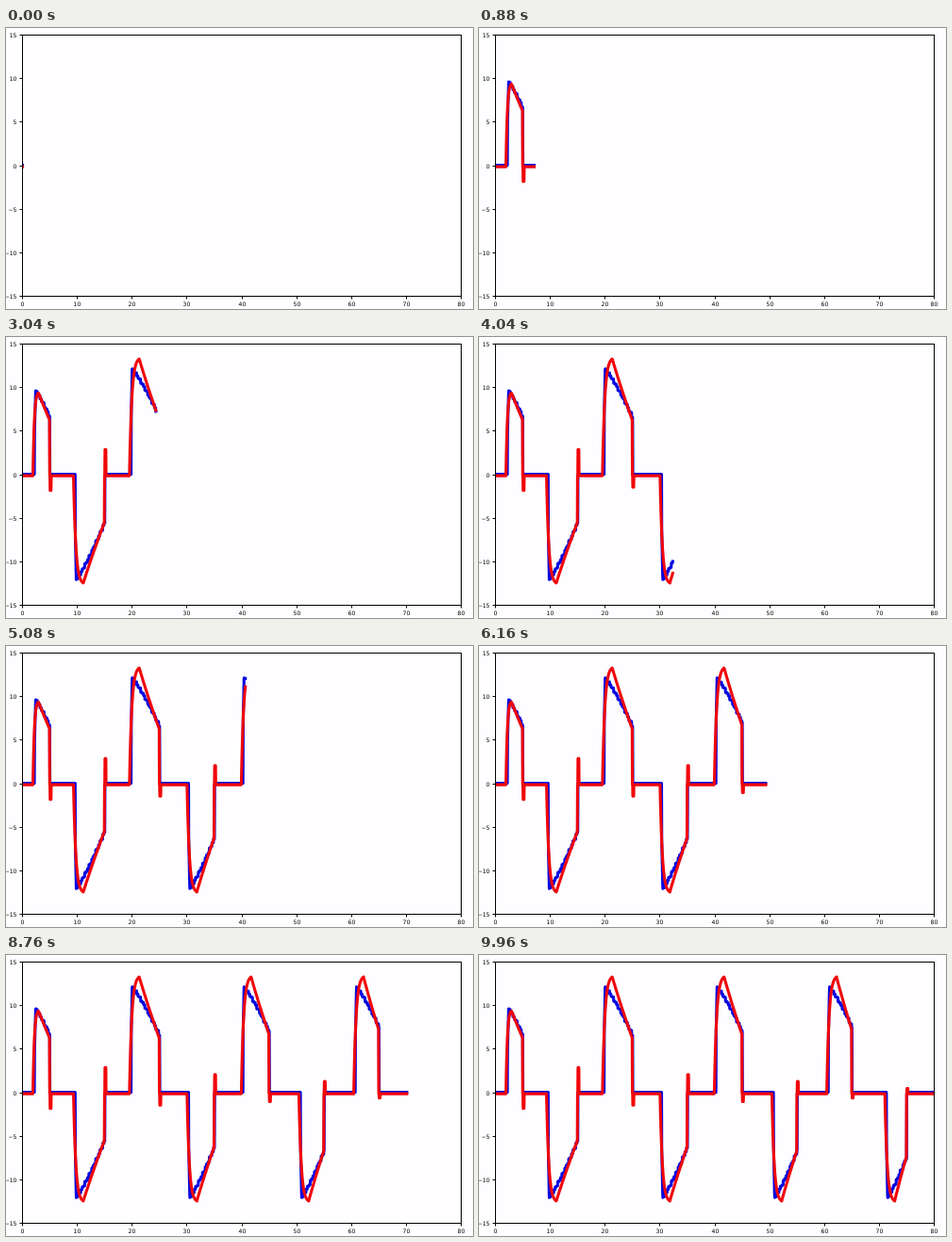
An HTML page for the animation above (10 s loop, 495x298 px).

```html
<!DOCTYPE html>
<html lang="en">
<head>
<meta charset="utf-8">
<title>Signal plot</title>
<style>
  html, body { margin: 0; width: 100%; height: 100%; overflow: hidden; background: #fefdff; }
  svg { display: block; width: 495px; height: 298px; }
  text { font: 6.1px "DejaVu Sans", sans-serif; fill: #000; }
  .axis { fill: none; stroke: #000; stroke-width: 1; }
  .line { fill: none; stroke-width: 3.1; stroke-linejoin: round; stroke-linecap: square; }
</style>
</head>
<body>
<svg viewBox="0 0 495 298">
  <clipPath id="plot"><rect x="17" y="7" width="465" height="278"/></clipPath>
  <g clip-path="url(#plot)">
    <polyline class="line" id="blue" stroke="#0606e0"/>
    <polyline class="line" id="red" stroke="#f0060a"/>
  </g>
  <g id="axes"><rect class="axis" x="17.5" y="7.5" width="465" height="277"/></g>
</svg>
<script>
const LEFT = 17.5, RIGHT = 482.5, TOP = 7.5, BOTTOM = 284.5;
const LOOP = 10000, STEP = 40;
const px = v => LEFT + v / 80 * (RIGHT - LEFT);
const py = v => BOTTOM - (v + 15) / 30 * (BOTTOM - TOP);
const $ = id => document.getElementById(id);

function add(tag, attrs, label) {
  const el = document.createElementNS("http://www.w3.org/2000/svg", tag);
  for (const key in attrs) el.setAttribute(key, attrs[key]);
  if (label !== undefined) el.textContent = label;
  $("axes").append(el);
}

const snap = v => Math.floor(v) + 0.5;
for (let v = 0; v <= 80; v += 10) {
  const x = snap(px(v));
  add("path", { class: "axis", d: `M${x} ${BOTTOM}v3` });
  add("text", { x, y: 295.3, "text-anchor": "middle" }, v);
}
for (let v = -15; v <= 15; v += 5) {
  const y = snap(py(v));
  add("path", { class: "axis", d: `M${LEFT} ${y}h-3` });
  add("text", { x: 11.5, y: y + 2.2, "text-anchor": "end" }, String(v).replace("-", "\u2212"));
}

// pulses alternate in sign; each one ends at 5, 15, 25 ...
const starts = [1.9, 9.3, 19.5, 30, 39.9, 50.4, 60.4, 71];
const mix = (a, b, t) => a + (b - a) * t;

function pulseAt(x) {
  const i = Math.floor((x + 2) / 10);
  if (i >= starts.length) return null;
  const sign = i % 2 ? -1 : 1, first = i === 0, end = 10 * i + 5;
  const low = (12.05 + 0.4 * sign - 1.1 * (end - starts[i])) * (first ? 0.71 : 1);
  return { i, sign, first, low, end, start: starts[i] };
}

// exponential rise, slow fall, short overshoot
function red(x) {
  const p = pulseAt(x);
  if (!p || x < p.start) return 0;
  const u = x - p.start, len = p.end - 0.07 - p.start, after = u - len;
  if (after > 0) {
    const over = (3.4 - 0.4 * p.i) * (p.sign > 0 ? 0.5 : 1);
    return after < 0.1 || after > 0.3 ? 0 : -p.sign * over;
  }
  const peak = p.first ? 9.7 : 13.05 + 0.55 * p.sign;
  const top = p.first ? 1 : 1.8;
  const rise = 1 - Math.exp(-u / (p.first ? 0.25 : 0.42));
  const fall = Math.max(0, (u - top) / (len - top)) ** 0.9;
  return p.sign * rise * mix(peak, p.low, fall);
}

// steep jump, then a ragged staircase back down
function blue(x) {
  const p = pulseAt(x);
  if (!p || x < p.start + 0.3 || x > p.end) return 0;
  const u = x - p.start - 0.3, n = Math.floor(u / 0.25);
  const fall = (n * 0.25 / (p.end - p.start - 0.3)) ** 1.2;
  const h = mix(p.first ? 9.6 : 12.1, p.low, fall) + 0.12 * Math.sin(n * 2.4);
  return p.sign * h * Math.min(1, 0.5 + u * 2.5);
}

function trace(fn, base, limit) {
  const pts = [];
  const put = x => pts.push(px(x).toFixed(2) + "," + (base + py(fn(x)) - py(0)).toFixed(2));
  for (let x = 0; x < limit; x += 0.04) put(x);
  put(limit);
  return pts.join(" ");
}

let shown = -1;
function draw(now) {
  const step = Math.floor(now % LOOP / STEP);
  if (step === shown) return;
  shown = step;
  const limit = Math.max(0.004, step * 0.32);
  $("blue").setAttribute("points", trace(blue, 145.6, limit));
  $("red").setAttribute("points", trace(red, 147.1, limit));
}

const begin = performance.now();
function tick() {
  draw(performance.now() - begin);
  requestAnimationFrame(tick);
}
tick();
</script>
</body>
</html>
```
